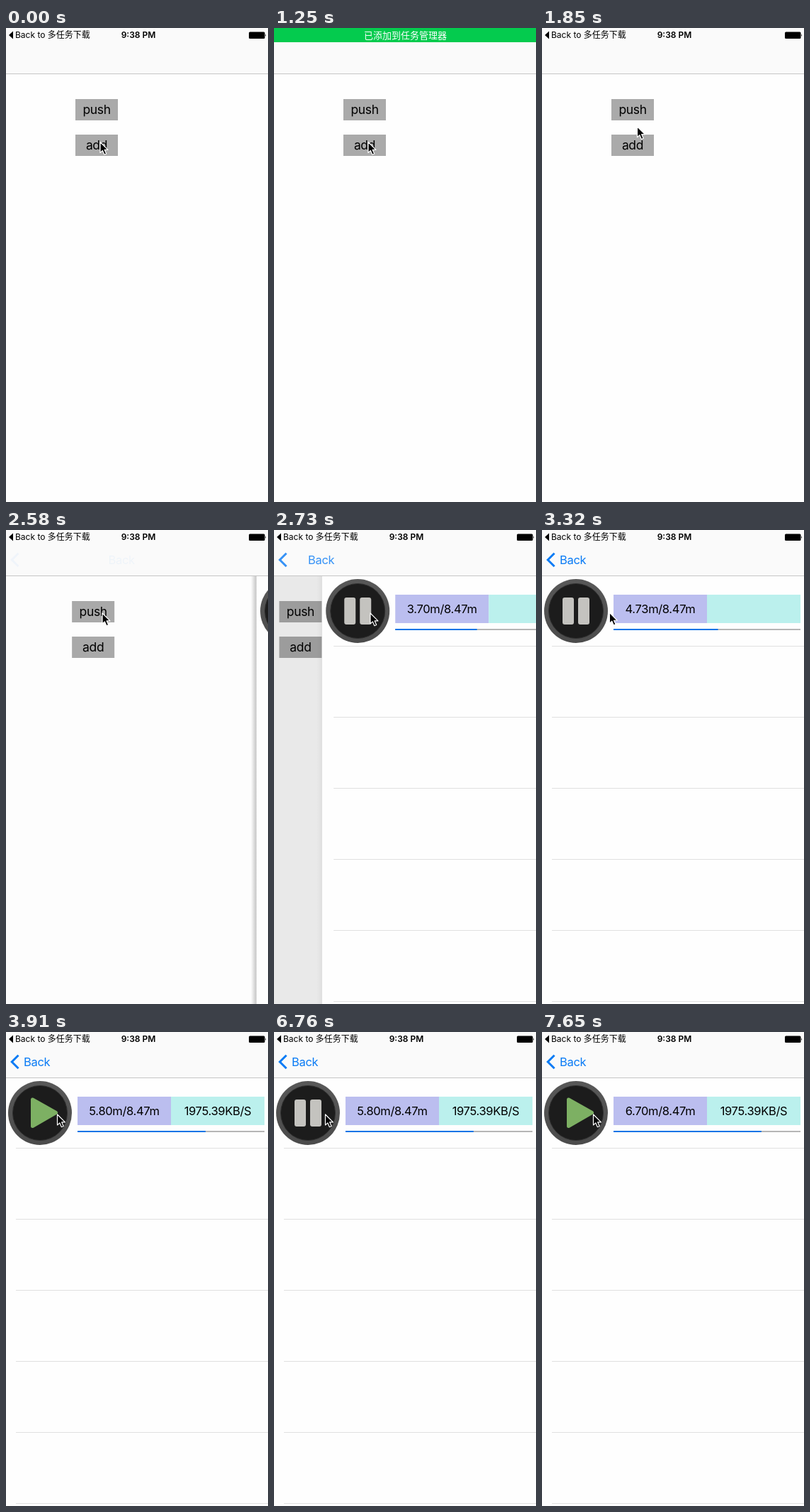
These frames come from a looping animation (370 by 667 pixels, 8 s). An HTML page:

```html
<!DOCTYPE html>
<html lang="zh">
<head>
<meta charset="utf-8">
<title>Download task</title>
<style>
  html, body { margin: 0; width: 100%; height: 100%; overflow: hidden; background: #fefefe; }
  svg { display: block; width: 100%; height: 100%; }
  text { font-family: Inter, "Noto Sans CJK SC", "Noto Sans CJK", sans-serif; }
  .label { font-size: 16.5px; letter-spacing: -.02em; }
  .button { font-size: 17.5px; letter-spacing: -.02em; }
  .mid { text-anchor: middle; }
</style>
</head>
<body>
<svg viewBox="0 0 370 667">
  <defs>
    <linearGradient id="shade">
      <stop offset="0" stop-color="#000" stop-opacity="0"/>
      <stop offset="1" stop-color="#000" stop-opacity=".24"/>
    </linearGradient>
    <linearGradient id="rim" x2="0" y2="1">
      <stop offset="0" stop-color="#585858"/>
      <stop offset="1" stop-color="#4b4b4b"/>
    </linearGradient>
  </defs>
  <rect width="370" height="667" fill="#fefefe"/>

  <g id="home" class="mid button">
    <path d="M98 100h60v30h-60zM98 150h60v30h-60z" fill="#aaa"/>
    <text x="128" y="121">push</text>
    <text x="128" y="171">add</text>
  </g>
  <rect id="dim" width="370" height="667"/>

  <g id="page">
    <rect id="shadow" x="-8" width="8" height="667" fill="url(#shade)"/>
    <rect width="370" height="667" fill="#fefefe"/>
  </g>
  <g id="content">
    <path d="M14 163.5h370m-370 100h370m-370 100h370m-370 100h370m-370 100h370m-370 100h370" stroke="#e0e0e0"/>
    <circle cx="48" cy="114" r="45" fill="url(#rim)"/>
    <circle cx="48" cy="114" r="38.5" fill="#1c1c1c" stroke="#303030"/>
    <g id="pause" fill="#c4c3bf">
      <rect x="29" y="95" width="16" height="38" rx="3"/>
      <rect x="51" y="95" width="16" height="38" rx="3"/>
    </g>
    <path id="play" d="M37.5 95v37.5L70.5 113.5z" fill="#7db063" stroke="#7db063" stroke-width="5" stroke-linejoin="round"/>
    <rect x="101" y="91" width="132" height="40" fill="#bbbeef"/>
    <rect x="233" y="91" width="132" height="40" fill="#bbf0ed"/>
    <text id="amount" class="mid label" x="167" y="117"></text>
    <text id="speed" class="mid label" x="299" y="117">1975.39KB/S</text>
    <rect x="101" y="139" width="264" height="2" fill="#b6b6b6"/>
    <rect id="bar" x="101" y="139" height="2" fill="#0a74e6"/>
  </g>

  <rect width="370" height="64" fill="#fafafa"/>
  <path d="M0 64.5h370" stroke="#c6c6c6"/>
  <path id="chevron" d="M17.5 32.7L8.2 42l9.3 9.3" fill="none" stroke="#0a7bf5" stroke-width="3"/>
  <text id="back" class="label" x="25" y="48" fill="#0a7bf5">Back</text>

  <path d="M10 4.5v11L4 10z"/>
  <text x="13" y="14" font-size="12">Back to 多任务下载</text>
  <text class="mid" x="187" y="14.3" font-size="12" font-weight="600">9:38 PM</text>
  <rect x="343" y="5.5" width="22.5" height="9.5" rx="1.5"/>
  <path d="M366.3 8.5q1.8 1.7 0 3.5z"/>

  <g id="banner">
    <rect width="370" height="20" fill="#04cb4e"/>
    <text class="mid" x="185.5" y="14.7" font-size="13" fill="#fff">已添加到任务管理器</text>
  </g>
  <path id="cursor" d="M0 0v15l3.4-3.1 2.5 5.8 2.8-1.2-2.5-5.6h4.7z" stroke="#fff" stroke-width="1.2" stroke-linejoin="round"/>
</svg>
<script>
const LOOP = 8000, TOTAL = 8.47;
const STEPS = [0, 500, 650, 800, 1250, 1400, 1550, 1700, 1840, 1990, 2140, 2280,
  2580, 2730, 2870, 3020, 3170, 3310, 3460, 3610, 3760, 3910,
  6760, 6900, 7050, 7200, 7350, 7500, 7650];
const BANNER = [[0, -20], [500, -17], [650, -7], [800, 0], [1550, -3], [1700, -13], [1840, -20]];
const el = Object.fromEntries([...document.querySelectorAll('[id]')].map(e => [e.id, e]));

const ramp = (t, a, b) => Math.min(1, Math.max(0, (t - a) / (b - a)));
const smooth = (t, a, b) => { const x = ramp(t, a, b); return x * x * (3 - 2 * x); };
const move = (e, x, y = 0) => e.setAttribute('transform', `translate(${x} ${y})`);
const show = (e, opacity) => e.setAttribute('opacity', opacity);

// Remaining share of a critically damped spring
function pushLeft(t) {
  const x = Math.max(0, 18.4 * (t - 2563.5) / 1000);
  return (1 + x) * Math.exp(-x);
}

function draw(now) {
  const clock = now % LOOP;
  const t = STEPS.findLast(s => s <= clock);

  const shift = 370 * pushLeft(t);
  const edge = t < 2580 ? 370 : Math.max(0, shift - 2.2);
  const left = edge / 370, done = 1 - left;
  move(el.home, -111 * done);
  show(el.dim, .1 * done);
  move(el.page, edge);
  show(el.shadow, t < 2580 ? 0 : left);
  move(el.content, shift);
  move(el.back, 125 * left);
  show(el.back, done);
  show(el.chevron, done ** 2 * (1 - ramp(shift, 0, 30)) + done * ramp(shift, 0, 30));

  const mb = 3.95 + 1.85 * (t < 3910 ? (t - 2870) / 1040 : 1) + .9 * ramp(t, 6760, 7650);
  el.amount.textContent = `${mb.toFixed(2)}m/${TOTAL}m`;
  el.bar.setAttribute('width', Math.max(0, 264 * mb / TOTAL));
  show(el.speed, t >= 3460 ? 1 : 0);
  const paused = t >= 3910 && t < 6760 || t >= 7650;
  show(el.play, paused ? 1 : 0);
  show(el.pause, paused ? 0 : 1);

  move(el.banner, 0, BANNER.findLast(([s]) => s <= t)[1]);
  const toPush = smooth(t, 1400, 2280), toIcon = smooth(t, 2870, 3610);
  move(el.cursor, 133 + 3 * toPush - 63.5 * toIcon, 160.5 - 43.5 * toPush - toIcon);
}

const start = performance.now();
function tick() {
  draw(performance.now() - start);
  requestAnimationFrame(tick);
}
tick();
</script>
</body>
</html>
```
